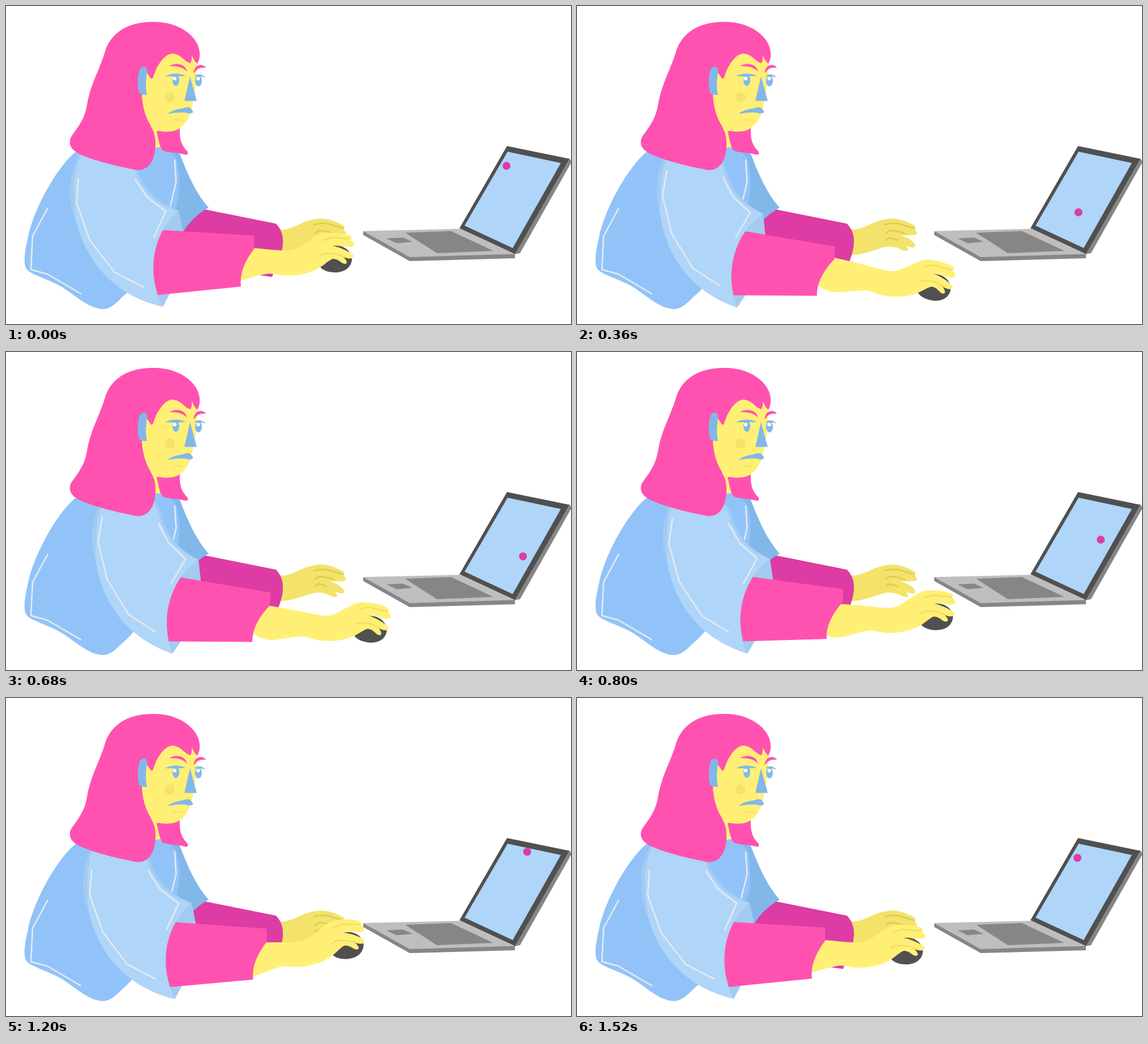
Animation of 998 by 561 pixels, one loop 1.84 s. Source, as an HTML page:

```html
<!DOCTYPE html>
<html lang="en">
<head>
<meta charset="utf-8">
<title>At the laptop</title>
<style>
  html, body { margin: 0; width: 100%; height: 100%; overflow: hidden; background: #fff; }
  svg { display: block; width: 100vw; height: 100vh; }
  .pink { fill: #ff52b0; }
  .plum { fill: #dc3ca4; }
  .skin { fill: #fff075; }
  .shade { fill: #f3e36b; }
  .body { fill: #91c3f9; }
  .sleeve { fill: #afd5f9; }
  .fold { fill: #a3cbf0; }
  .blue { fill: #82b7ea; }
  .dark { fill: #505050; }
  .mid { fill: #868686; }
  .light { fill: #bebebe; }
  .stitch, .crease { fill: none; stroke-width: 2.6; }
  .stitch { stroke: #e6eaf0; }
  .crease { stroke: #f0df68; stroke-linejoin: round; }
  .deep { stroke: #dccb55; }
</style>
</head>
<body>
<svg viewBox="0 0 998 561" preserveAspectRatio="none">
  <!-- torso -->
  <path class="body" d="M122 258C85 290 47 365 39 408C33 432 29 458 38 466C48 475 74 482 94 493C119 507 142 532 168 534.500C188 536 198 519 214 506L312 400L305 266L296 256Q285 249 270 247L250 240Z"/>

  <!-- far arm -->
  <path class="shade" d="M476 394L490 394.500C510 392 523 380 542 377C562 372 576 377 596 387C600 391 597 393 593 393C602 397 603 404 596 404C586 405 578 404 571 405C582 407 592 413 596 419C600 425 595 428 588 425L581 423C587 429 586 434 580 432C573 431 566 425 556 425C538 421 520 439 476 440Z"/>
  <path class="crease deep" d="M543 386Q558 382 570 384.500L597 393M545 401L553 396Q568 397 580 402M545 413L553 409L567 413.500"/>
  <path class="plum" d="M300 400L335 357L352 359L477 384C489 397 491 410 488 428C484 448 476 462 470 478L340 460Z"/>
  <path class="blue" d="M284 250L307 261C321 297 335 330 358 356L352 359Q328 374 313 398L285 392C306 350 312 315 301 270Z"/>
  <path class="stitch" d="M298 271L300.500 311L290 354M74 356L47 406L44 465L73 473L133 508"/>

  <!-- near forearm, hand and mouse -->
  <g id="hand">
    <path class="dark" d="M555 460C553 440 563 423 581 423C599 422 611 434 611 447C610 462 597 470 581 470C570 470 558 466 555 460Z"/>
    <path class="skin" d="M368 423L438 427C465 429 490 433 505 431C525 426 540 406 560 401C578 398 600 401 609 406C613 410 610 412 604 411L611 414C617 419 617 424 609 425C598 425 588 420 576 423C590 425 605 433 612 438C616 443 611 447 603 445L596 443C603 449 604 455 598 455C590 453 588 446 577 446C562 452 552 475 495 476C482 475 473 472 465 472C447 474 432 480 415 484C398 487 379 481 368 469Z"/>
    <path class="crease" d="M558 414L575 408L609 411.500M554 441L563 436.500L581 437L600 443"/>
  </g>

  <!-- near sleeve -->
  <g id="arm">
    <path class="fold" d="M305 361L313 398L289 508L277 531L240 480L270 380Z"/>
    <path class="pink" d="M272 395L438 405L438.500 428C424 447 412 470 415 495L266 510L250 470Z"/>
    <path class="fold" d="M160 232C128 250 112 290 113 330C114 352 117 366 126 386L200 380L305 361C262 344 244 320 232 290Q226 275 214 263Q195 235 160 232Z"/>
    <path class="sleeve" d="M160 234C128 252 117 295 121 340C122 360 122 371 125 384C138 434 176 507 277 531C246 470 260 399 305 361C268 353 246 330 231 300Q224 277 210 264Q192 238 160 234Z"/>
    <path class="stitch" d="M128 303L125 348L148 413L192 470L243 496M227 304L249 337L282 362L261 409"/>
  </g>

  <!-- head -->
  <path class="skin" d="M258 210H268L274 249L262 250Z"/>
  <path class="pink" d="M266 221L307 214C306 238 311 247 321 257C322 262 320 263 316 262C300 258 285 259 277 255C271 249 270 237 266 221Z"/>
  <path class="pink" d="M262 28C215 27 185 48 175 80C165 114 150 135 143 175C138 205 121 220 114 233C109 247 119 257 134 263C168 277 205 284 231 289.500C256 291 265 265 264 240C264 228 260 220 256 212L262 140L318 108L338 102C341 96 343 90 342 82C340 53 305 28 262 28Z"/>
  <path class="skin" d="M248 116L256 128H259C263 118 265 110 270 103C277 92 285 84 295 84C311 86 314 98 326 101Q329 94 328 86Q332 97 338 102C339 128 333 158 328 182C323 200 315 212 302 218.500C288 224 272 222 260 217C248 202 241 180 240 157L246 150Z"/>
  <path class="blue" d="M249.500 113C247 105 240 105 236 112C232 122 232 143 235 153Q238 157 249 157C246 143 247 128 249.500 113Z"/>
  <circle class="shade" cx="289" cy="161" r="9.200"/>
  <path class="shade" d="M292 203Q304 194 316 205Q304 200 292 203Z"/>
  <path class="pink" d="M288 106C299 99 317 101 320 116Q311 105 288 106ZM331 118Q334 103 345 104Q351 105 353 109Q339 107 333 117Z"/>
  <path class="blue" d="M281 124Q298 115 318 123.500Q299 124 281 124ZM332 124Q342 116 353 126Q342 123 332 124Z"/>
  <g class="blue">
    <ellipse cx="300" cy="131" rx="6" ry="10"/>
    <ellipse cx="340" cy="132" rx="6" ry="10"/>
    <path d="M325 124L337 167.500H315ZM285 190.500C296 182 307 182 314 180C322 177 326 179 327 182Q331 185 330 188Q325 191 317 188Q301 187 285 190.500Z"/>
  </g>
  <g fill="#fff"><circle cx="298" cy="128" r="3.200"/><circle cx="339.500" cy="128" r="3.200"/></g>

  <!-- laptop -->
  <path class="mid" d="M631 397L631 404L713 450L899 445V437L713 442Z"/>
  <path class="light" d="M631 397L803 393L899 437.500L713 443Z"/>
  <path class="mid" d="M705 400L786 397L861 432L761 436ZM672 410L701 408.500L718 416L690 418.500Z"/>
  <path class="mid" d="M985 269L995 269L998 273V277L908 436L898 438Z"/>
  <path class="dark" d="M885 247L995 269.500L899 437.500L801 392Z"/>
  <path class="sleeve" d="M886 257L980 277L895 427L810 387.500Z"/>
  <circle id="dot" class="plum" r="7"/>
</svg>
<script>
  const STEP = 40, LOOP = 1840;
  const get = id => document.getElementById(id);
  const hand = get('hand'), arm = get('arm'), dot = get('dot');

  // dot path: bend is the control point on the way to the next pose
  const poses = [
    { t: 0,    arm: [243, 496, 0],   hand: [283, 456, 0],    dot: [884, 282], bend: [879, 344] },
    { t: 520,  arm: [257, 493, 8.8], hand: [358, 455, 14],   dot: [892, 398], bend: [928, 343] },
    { t: 1000, arm: [278, 496, 0.9], hand: [320.3, 487, -9], dot: [938, 280], bend: [918, 261] }
  ];
  poses.push({ ...poses[0], t: 1520 });

  const mix = (a, b, k) => a.map((v, i) => v + (b[i] - v) * k);

  function place(el, [x, y, angle], [px, py]) {
    el.setAttribute('transform', `translate(${x} ${y}) rotate(${angle}) translate(${-px} ${-py})`);
  }

  function draw(ms) {
    const t = Math.min(Math.floor(ms / STEP) * STEP, 1520);
    let i = 0;
    while (i < 2 && t >= poses[i + 1].t) i++;
    const a = poses[i], b = poses[i + 1];
    const k = (t - a.t) / (b.t - a.t);
    place(arm, mix(a.arm, b.arm, k), poses[0].arm);
    place(hand, mix(a.hand, b.hand, k), poses[0].hand);
    const [x, y] = mix(mix(a.dot, a.bend, k), mix(a.bend, b.dot, k), k);
    dot.setAttribute('cx', x);
    dot.setAttribute('cy', y);
  }

  function tick() {
    draw(performance.now() % LOOP);
    requestAnimationFrame(tick);
  }
  tick();
</script>
</body>
</html>
```
